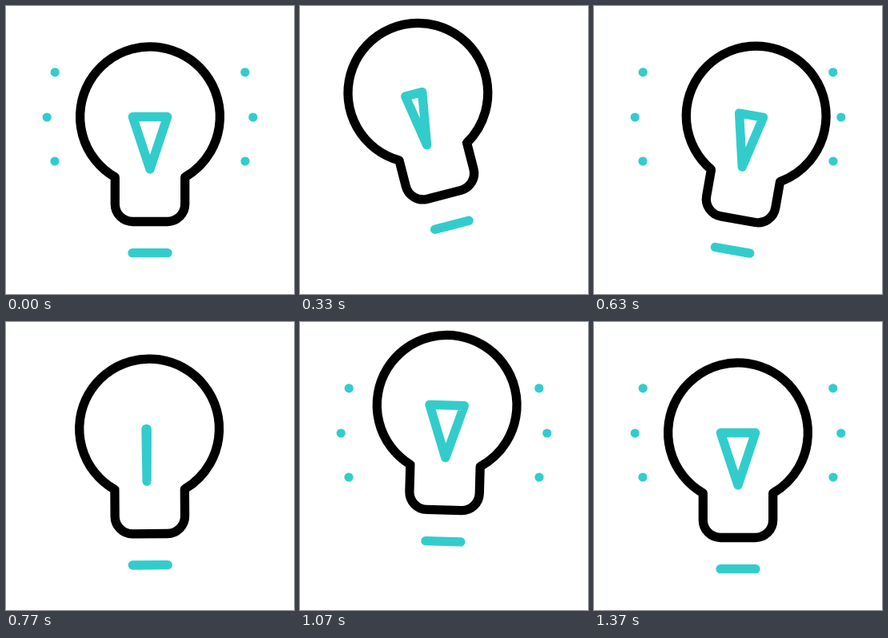
An HTML page with a canvas that plays this animation: 360x360 px, repeating every 1.67 s.

```html
<!DOCTYPE html>
<html lang="en">
<head>
<meta charset="utf-8">
<title>Light bulb</title>
<style>
  html, body { margin: 0; width: 100%; height: 100%; overflow: hidden; background: #fff; }
  canvas { display: block; width: 360px; height: 360px; }
</style>
</head>
<body>
<canvas id="stage" width="360" height="360"></canvas>
<script>
const ctx = document.getElementById('stage').getContext('2d');
const LOOP = 1670;
const END = 41;          // last moving step, at 30 steps per second
const BLINK = END / 3;   // dots are on for the first half of each blink
const TEAL = '#33cccc';
const PIVOT = { x: 180, y: 269 };

// Keys are [step, value] pairs.
const LIFT = [[0, 0], [11.4, -35], [20.7, 0], [30.4, -36.5], [41, 0]];
const TILT = [[0, 0], [11.4, -15], [18.9, 10], [26.9, -10], [35.5, 8], [41, 0]];
const FLIP = [[1, 1], [14.5, -1], [15.1, -1], [30.6, 1]];

function ease(keys, step) {
  if (step <= keys[0][0]) return keys[0][1];
  for (let i = 1; i < keys.length; i++) {
    const [start, from] = keys[i - 1];
    const [end, to] = keys[i];
    if (step < end) {
      const p = (step - start) / (end - start);
      return from + (to - from) * (1 - Math.cos(Math.PI * p)) / 2;
    }
  }
  return keys[keys.length - 1][1];
}

function strokePath(color, trace) {
  ctx.strokeStyle = color;
  ctx.beginPath();
  trace();
  ctx.stroke();
}

function drawDots() {
  ctx.fillStyle = TEAL;
  for (const side of [-1, 1]) {
    for (const [dx, y] of [[118.8, 82.8], [128.8, 139], [119, 194]]) {
      ctx.beginPath();
      ctx.arc(180 + side * dx, y, 5.6, 0, Math.PI * 2);
      ctx.fill();
    }
  }
}

function drawBulb() {
  const radius = 87.4, neck = 43.7, bottom = 269.5, corner = 22;
  const left = 180 - neck, right = 180 + neck;
  const gap = Math.asin(neck / radius);
  strokePath('#000', () => {
    ctx.arc(180, 138.3, radius, Math.PI / 2 + gap, Math.PI / 2 - gap);
    ctx.arcTo(right, bottom, 180, bottom, corner);
    ctx.arcTo(left, bottom, left, 214, corner);
    ctx.closePath();
  });
}

function drawFilament(flip) {
  const axis = 176.4;
  const flipX = x => axis + (x - axis) * flip;
  strokePath(TEAL, () => {
    ctx.moveTo(flipX(158.3), 138.5);
    ctx.lineTo(flipX(201.7), 138.5);
    ctx.lineTo(flipX(180), 204);
    ctx.closePath();
  });
}

function drawFoot() {
  strokePath(TEAL, () => {
    ctx.moveTo(158, 308.7);
    ctx.lineTo(202, 308.7);
  });
}

function draw(time) {
  const step = Math.min(END, Math.floor((time % LOOP + 5) * 0.03));
  ctx.fillStyle = '#fff';
  ctx.fillRect(0, 0, 360, 360);
  if (step >= END || step % BLINK < BLINK / 2) drawDots();

  ctx.save();
  ctx.translate(PIVOT.x, PIVOT.y + ease(LIFT, step));
  ctx.rotate(ease(TILT, step) * Math.PI / 180);
  ctx.translate(-PIVOT.x, -PIVOT.y);
  ctx.lineWidth = 11.3;
  ctx.lineCap = ctx.lineJoin = 'round';
  drawBulb();
  drawFilament(ease(FLIP, step));
  drawFoot();
  ctx.restore();
}

let startTime;
function tick(now) {
  startTime ??= now;
  draw(now - startTime);
  requestAnimationFrame(tick);
}
draw(0);
requestAnimationFrame(tick);
</script>
</body>
</html>
```
